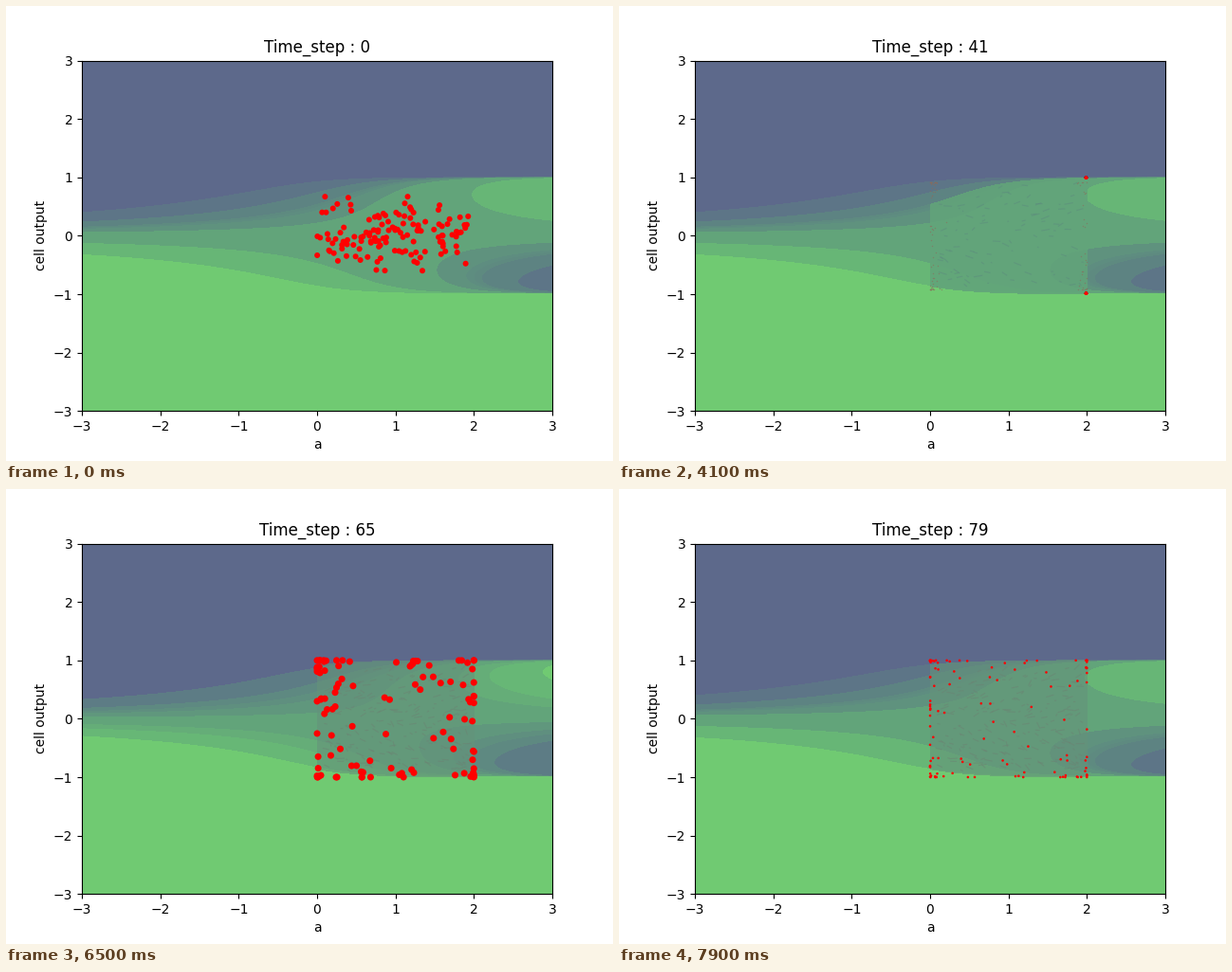
Write a matplotlib script that moves like this. It is 640 by 480 pixels and loops after 8000 ms.

```python
import numpy as np
import matplotlib.pyplot as plt
from matplotlib.animation import FuncAnimation
from matplotlib.collections import LineCollection
from matplotlib.colors import LinearSegmentedColormap

FRAMES = 80
SETTLE = 9       # steps until the cells reach their fixed points
RESTART = 60     # step at which the cells turn chaotic
MID = "#62a47a"

rng = np.random.default_rng(11)
shades = LinearSegmentedColormap.from_list("shades", [
    (0, "#5d698b"), (0.3, "#5d8482"), (0.58, MID),
    (0.82, "#67b676"), (1, "#70ca72")])
shades.set_extremes(under="#5d698b", over="#70ca72")

fig, ax = plt.subplots(figsize=(6.4, 4.8), dpi=100)
ax.set(xlim=(-3, 3), ylim=(-3, 3), xlabel="a", ylabel="cell output")
title = ax.set_title("Time_step : 0", pad=6.5)


def field(a0, a1, **style):
    """Contours of dx/dt = -x + a*y with y = tanh(x), saturated beyond |y| = 1."""
    x = np.linspace(-6, 6, 241)
    y = np.tanh(x)
    if a0 < 0:
        x, y = np.r_[-20, x, 20], np.r_[-3, y, 3]
    a = np.linspace(a0, a1, 201)
    return ax.contourf(a, y, -x[:, None] + a * y[:, None], **style)


def bands(levels):
    return field(-3, 3, levels=levels, cmap=shades, vmin=-1.7, vmax=1.5,
                 extend="both", zorder=1)


def veil(low, color, alpha):
    """Flat tint over the part of the field the cells have visited."""
    return field(0, 2, levels=[low, 1.31], colors=[color], alpha=alpha, zorder=2)


def streaks(n, color):
    mid = np.column_stack([rng.uniform(0.1, 1.95, n), rng.uniform(-0.9, 0.9, n)])
    ang = rng.normal(0.35, 0.4, n) * np.sign(mid[:, 1])
    step = rng.uniform(0.01, 0.06, (n, 1)) * np.column_stack([np.cos(ang), np.sin(ang)])
    return ax.add_collection(LineCollection(
        np.stack([mid - step, mid + step], axis=1),
        colors=color, linewidths=0.8, alpha=0.5, zorder=3))


def edgy(angle):
    """Cosine pushed towards -1 and 1."""
    return np.sin(np.pi / 2 * np.cos(angle))


def area(radius_px):
    return (2 * radius_px * 72 / fig.dpi) ** 2


calm = bands([-1.62, -0.95, -0.6, -0.53, -0.46, -0.22, 0.52, 1.31])
driven = bands([-1.33, -0.72, -0.5, -0.35, -0.1, 0.4, 0.68, 1.21])
early_veil = veil(-0.6, MID, 0.85)
late_veil = veil(-1.62, "#65937a", 0.6)
early_streaks = streaks(100, "#5c8a7e")
late_streaks = streaks(200, "#6c8273")

# Faint leftovers along the two side walls
n = 100
wall = rng.exponential(0.04, n)
specks = ax.scatter(np.where(rng.random(n) < 0.65, wall, 2 - wall),
                    0.92 * edgy(rng.uniform(0, np.pi, n)),
                    s=area(0.7), c="#8c6a5c", alpha=0.6, linewidths=0, zorder=4)

n = 130
start = np.column_stack([rng.uniform(0, 1.95, n),
                         np.clip(rng.normal(0.03, 0.3, n), -0.67, 0.67)])
stray = start[:, 0] < 0.5
goal = np.column_stack([np.where(stray, 0.02, 1.99),
                        np.where(stray, 1.35 * start[:, 1],
                                 0.99 * np.sign(start[:, 1]))])
phase = rng.uniform(0, 2 * np.pi, (110, 2))
cells = ax.scatter([], [], c="red", linewidths=0, zorder=5)


def settling(k):
    t = min(k / SETTLE, 1)
    pos = start + (goal - start) * (1 - (1 - t) ** 2)
    size = area(3.0 - 1.4 * t) * np.where(stray, 1 - t, 1)
    return pos, size


def chaotic(k):
    # Angle doubling scatters the cells anew at each step
    pos = edgy(phase * 2.0 ** (k - RESTART)) + [1, 0]
    radius = np.interp(k, [RESTART, 66, 71, 79], [1.6, 3.9, 3.7, 1.3])
    return pos, np.full(len(pos), area(radius))


def draw(k):
    title.set_text(f"Time_step : {k}")
    late = k >= RESTART
    stirred = RESTART < k < 72
    calm.set_visible(not stirred)
    driven.set_visible(stirred)
    early_veil.set_visible(0 < k < RESTART)
    early_streaks.set_visible(1 < k < RESTART)
    specks.set_visible(4 < k < RESTART)
    late_veil.set_visible(late)
    late_streaks.set_visible(late)

    pos, size = chaotic(k) if late else settling(k)
    cells.set_offsets(pos)
    cells.set_sizes(size)
    return []


anim = FuncAnimation(fig, draw, frames=FRAMES, interval=100,
                     repeat=True, repeat_delay=0)
plt.show()
```
